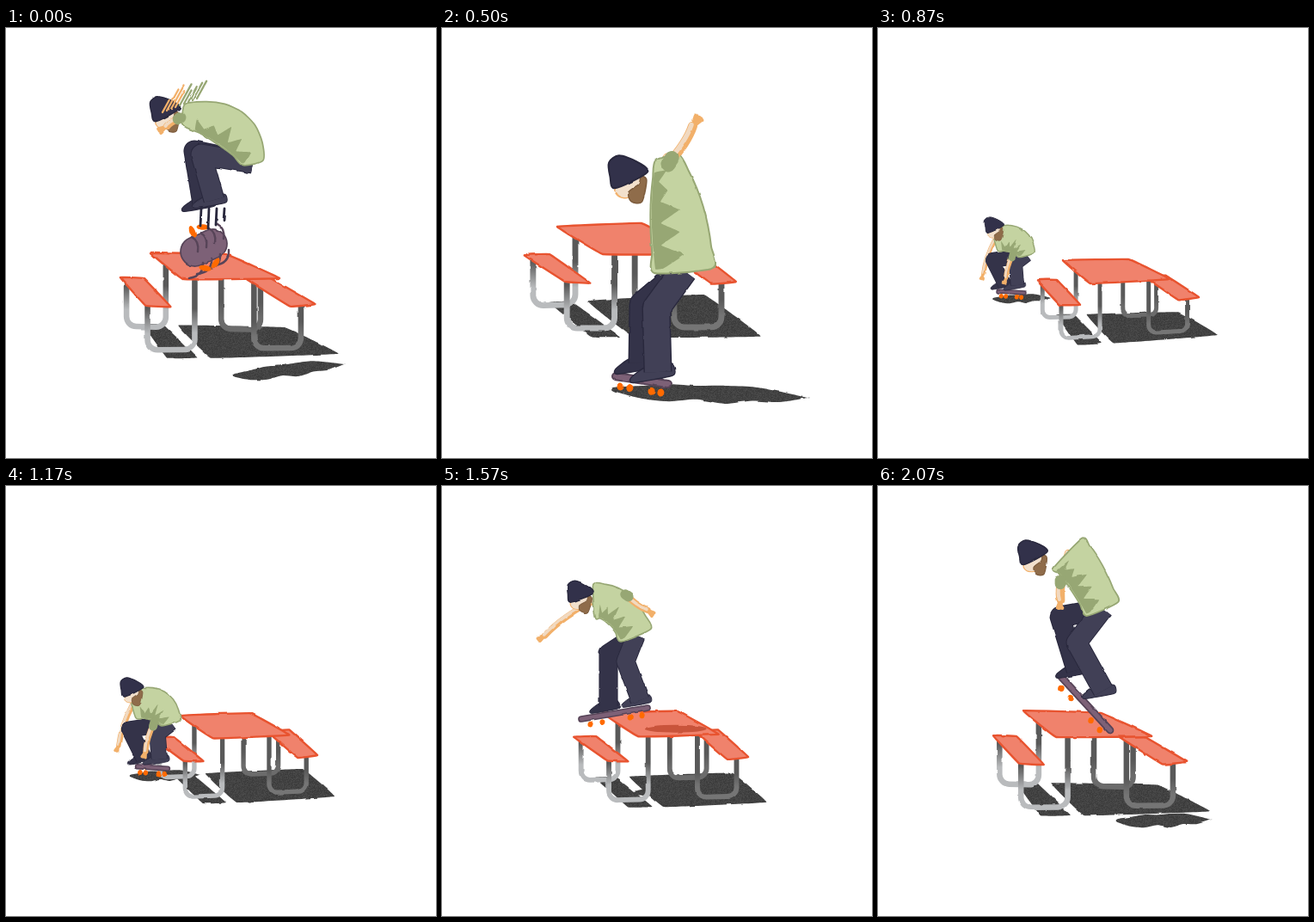
An HTML page with a canvas for the animation above (2100 ms loop, 500 by 500 pixels).

```html
<!DOCTYPE html>
<html lang="en">
<head>
<meta charset="utf-8">
<title>Skater over a picnic table</title>
<style>
html, body { margin: 0; width: 100%; height: 100%; overflow: hidden; background: #fff; }
canvas { display: block; width: 500px; height: 500px; filter: url(#rough); }
svg { position: absolute; width: 0; height: 0; }
</style>
</head>
<body>
<svg aria-hidden="true">
  <filter id="rough" x="0" y="0" width="1" height="1" color-interpolation-filters="sRGB">
    <feTurbulence id="wobble" type="fractalNoise" baseFrequency=".07" numOctaves="2" result="n"/>
    <feDisplacementMap in="SourceGraphic" in2="n" scale="2.5" xChannelSelector="R" yChannelSelector="G"/>
  </filter>
</svg>
<canvas id="stage" width="500" height="500"></canvas>
<script>
const LOOP = 2100, CUT = 670;
const ctx = document.getElementById('stage').getContext('2d');
const wobble = document.getElementById('wobble');
const ink = '#29283d', fire = '#ff6a00', skin = '#f2b06a', plum = '#574458',
  shirtTone = '#c4d3a1', leaf = '#97a774', rust = '#c9543b';

const lerp = (a, b, u) => a + (b - a) * u;
const mix = (p, q, u) => p.map((v, i) => lerp(v, q[i], u));
const pairs = s => s.split(' ').map(p => p.split(',').map(Number));
function seeded(seed) {
  return () => (seed = seed * 16807 % 2147483647) / 2147483647;
}

// ---- Drawing helpers ----

// Closed outline; k sets how round the corners are
function blob(pts, fill, line, width, k = .1) {
  const n = pts.length, at = i => pts[(i + n) % n];
  ctx.beginPath();
  ctx.moveTo(...pts[0]);
  for (let i = 0; i < n; i++) {
    const [p, a, b, q] = [at(i - 1), at(i), at(i + 1), at(i + 2)];
    ctx.bezierCurveTo(a[0] + (b[0] - p[0]) * k, a[1] + (b[1] - p[1]) * k,
      b[0] - (q[0] - a[0]) * k, b[1] - (q[1] - a[1]) * k, b[0], b[1]);
  }
  ctx.fillStyle = fill;
  ctx.fill();
  if (line) stroke(line, width);
}

function stroke(color, width, cap = 'round') {
  ctx.strokeStyle = color;
  ctx.lineWidth = width;
  ctx.lineCap = cap;
  ctx.stroke();
}

function trace(pts) {
  ctx.beginPath();
  for (const p of pts) ctx.lineTo(...p);
}

function curve(a, c, b, color, width) {
  ctx.beginPath();
  ctx.moveTo(...a);
  ctx.quadraticCurveTo(...c, ...b);
  stroke(color, width);
}

function ellipse([x, y], rx, ry, turn, fill) {
  ctx.beginPath();
  ctx.ellipse(x, y, rx, ry, turn, 0, 7);
  ctx.fillStyle = fill;
  ctx.fill();
}

// Band along a curve through a, m, b; at(s, o) spans it, o from -1 to 1
function band(a, m, b, halfWidth) {
  const c = [0, 1].map(i => 2 * m[i] - (a[i] + b[i]) / 2);
  return (s, o) => {
    const p = mix(a, c, s), q = mix(c, b, s), [x, y] = mix(p, q, s);
    const dx = q[0] - p[0], dy = q[1] - p[1];
    const w = o * halfWidth(s) / (Math.hypot(dx, dy) || 1);
    return [x + dy * w, y - dx * w];
  };
}

const steps = n => Array.from({ length: n + 1 }, (_, i) => i / n);

// Grainy asphalt tone for the ground shadows
const grain = (() => {
  const tile = document.createElement('canvas');
  tile.width = tile.height = 128;
  const c = tile.getContext('2d'), rnd = seeded(7);
  for (let i = 0; i < 128 * 128; i++) {
    const v = 58 + rnd() * 18 | 0;
    c.fillStyle = `rgb(${v},${v},${v})`;
    c.fillRect(i % 128, i >> 7, 1, 1);
  }
  return ctx.createPattern(tile, 'repeat');
})();

// ---- Table: four corners of the top and a height place everything else ----

const views = [
  [870, 215, 270, 292, 269, 339, 292, 247, 297, 62],
  [1370, 194, 265, 279, 261, 323, 288, 237, 291, 70],
  [2100, 168, 261, 258, 264, 318, 291, 206, 292, 82],
  [2600, 134, 231, 232, 227, 300, 263, 187, 263, 86]
];

// Maps (across, deep, down) of the table to the stage
function tableView(t) {
  const i = t < 1370 ? 0 : t < 2100 ? 1 : 2;
  const u = (t - views[i][0]) / (views[i + 1][0] - views[i][0]);
  const v = mix(views[i], views[i + 1], i === 2 ? u ** 1.6 : u);
  const at = (x, z, y) => {
    const [px, py] = mix(mix(v.slice(1, 3), v.slice(3, 5), x), mix(v.slice(7, 9), v.slice(5, 7), x), z);
    return [px, py + y * v[9]];
  };
  return { at, height: v[9] };
}

function drawGround({ at }) {
  blob([at(-.1, 0, 1.02), at(.17, 0, 1.02), at(.06, 1.25, 1.02), at(-.24, 1.25, 1.02)], grain, null, 0, .02);
  blob([at(.36, 0, 1.02), at(1.74, 0, 1), at(1.46, 1.25, 1), at(.2, 1.25, 1.03)], grain, null, 0, .02);
}

function drawTable({ at, height }) {
  const leg = (left, z, benchLeft, light) => {
    const right = left + .49;
    const a = at(left, z, benchLeft ? .37 : .03), d = at(right, z, benchLeft ? .03 : .37);
    const b = at(left, z, 1), c = at(right, z, 1);
    const tone = ctx.createLinearGradient(0, d[1], 0, b[1]);
    tone.addColorStop(.4, '#595959');
    tone.addColorStop(.75, light);
    ctx.beginPath();
    ctx.moveTo(...a);
    ctx.arcTo(...b, ...c, height * .14);
    ctx.arcTo(...c, ...d, height * .14);
    ctx.lineTo(...d);
    stroke(tone, height * .08);
  };
  const plank = (...pts) => blob(pts, '#f0826c', '#e8532f', 2.4, .02);
  leg(.82, .15, false, '#6b6b6b');
  leg(-.36, .15, true, '#b9bbbd');
  leg(.75, .97, false, '#757575');
  leg(-.37, 1, true, '#b9bbbd');
  plank(at(1.25, 0, .34), at(1.55, 0, .31), at(1.37, 1, .37), at(1.11, 1, .4));
  plank(at(-.39, 0, .37), at(-.09, 0, .37), at(-.13, 1, .39), at(-.39, 1, .37));
  plank(at(0, 0, 0), at(1, 0, 0), at(1, 1, 0), at(0, 1, 0));
}

// ---- Skater: a jointed figure, its key poses and the motion between ----

const joints = ['head', 'neck', 'spine', 'hip', 'kneeFar', 'footFar', 'kneeNear', 'footNear',
  'handFar', 'shoulder', 'handNear', 'tail', 'nose', 'shadeFrom', 'shadeTo'];

// size of the figure, tilt of the head, shirt half widths, deck thickness
function pose(time, size, tilt, top, hem, deck, places) {
  const p = { time, body: [size, tilt, top, hem, deck] };
  pairs(places).forEach((xy, i) => p[joints[i]] = xy);
  return p;
}

function moved(from, time, scale, dx, dy) {
  const [size, tilt, ...widths] = from.body;
  const p = { time, body: [size * scale, tilt, ...widths.map(w => w * scale)] };
  for (const j of joints) p[j] = [from[j][0] * scale + dx, from[j][1] * scale + dy];
  return p;
}

const crouch = pose(870, .49, -.45, 13, 9, 4,
  '137,234 136,246 160,247 173,264 133,270 147,298 160,274 162,299 121,291 157,263 147,297 140,306 170,308 134,315 201,314');
const ollie = pose(1370, .62, -.4, 16, 13, 9,
  '146,152 148,155 183,150 210,172 174,181 173,239 191,196 198,239 92,201 198,150 210,182 152,252 201,252 218,334 288,333');
const land = pose(1770, .72, -.36, 22, 25, 3,
  '179,108 206,112 226,135 241,175 213,208 214,273 236,212 263,259 134,156 228,102 281,116 172,290 277,264 224,378 246,377');
const pop = pose(2070, .75, -.5, 24, 20, 7,
  '183,84 221,78 241,104 261,143 212,152 231,214 231,182 262,238 212,142 212,110 212,142 213,222 270,284 278,389 387,388');
const flip = pose(2100, .76, -.5, 12, 12, 34,
  '188,101 207,101 261,117 287,157 219,143 229,204 227,147 242,200 190,115 203,104 179,120 220,260 240,251 266,404 393,391');
const drop = pose(2400, .8, -.75, 9, 25, 16,
  '205,155 239,137 267,190 274,245 246,298 247,380 255,302 255,378 240,150 234,137 161,164 231,402 258,397 224,426 372,402');
const roll = pose(2600, 1, -.46, 14, 34, 8,
  '220,177 262,151 273,212 281,282 234,322 233,390 249,326 251,400 264,170 263,158 298,104 202,405 262,414 200,420 425,430');
const keys = [moved(crouch, 670, .9, -4, 31), crouch, moved(crouch, 1170, 1.2, -16, -41),
  ollie, land, pop, flip, drop, roll, moved(roll, 2700, 1, 6, 4)];

function skaterAt(t) {
  const i = Math.max(1, keys.findIndex(k => k.time >= t));
  const a = keys[i - 1], b = keys[i], p = {};
  for (const part of ['body', ...joints]) p[part] = mix(a[part], b[part], (t - a.time) / (b.time - a.time));
  return p;
}

// Points drawn around an origin, then turned and scaled
function placed(points, [x, y], turn, scale) {
  const c = Math.cos(turn) * scale, s = Math.sin(turn) * scale;
  return pairs(points).map(([px, py]) => [x + px * c - py * s, y + px * s + py * c]);
}

function drawShadow({ body: [size], shadeFrom: a, shadeTo: b }) {
  const rnd = seeded(31);
  const thick = Math.min(10 * size, Math.hypot(b[0] - a[0], b[1] - a[1]) * .08);
  const at = band(a, mix(a, b, .5), b, s => thick * Math.sqrt(Math.sin(Math.PI * Math.min(1, s + .03))));
  const edge = o => steps(7).map(s => at(s, o * (.7 + .6 * rnd())));
  blob([...edge(1), ...edge(-1).reverse()], grain, null, 0, .12);
}

function drawBoard({ body: [size, , , , deck], tail, nose }) {
  const turn = Math.atan2(nose[1] - tail[1], nose[0] - tail[0]);
  const spinning = deck > 12, flipped = deck > 25;
  const line = 1 + size;
  trace([tail, nose]);
  stroke(plum, deck + line);
  stroke('#7d6177', Math.max(1, deck - line));
  if (flipped) {
    for (let i = 0; i < 4; i++) {
      const x = tail[0] - 4 + i * 10, y = tail[1] - 17 - i * 5;
      curve([x, y], [x + 9, y + 5], [x + 7, y + 17], plum, 2.5);
      curve([x - 4, y + 48], [x + 14, y + 46], [x + 13, y + 30], plum, 2.5);
    }
  }
  [.12, .3, .72, .9].forEach((s, i) => {
    const drop = (deck / 2 + 7 * size) * (flipped && i % 2 ? -1 : 1);
    const [x, y] = mix(tail, nose, s);
    const at = [x - Math.sin(turn) * drop, y + Math.cos(turn) * drop];
    ellipse(at, 1 + 3 * size, (1 + 3.5 * size) * (spinning ? 2 : 1), spinning ? i - 1.4 : .2, fire);
  });
}

function drawLeg(hip, knee, foot, size, fill) {
  const shoe = placed('17,-7 17,6 -30,9 -32,3 -14,-7', foot, -.12, size);
  const line = 1.4 * size;
  blob(shoe, fill, ink, line);
  trace([hip, knee, foot]);
  stroke(ink, 33 * size, 'butt');
  stroke(fill, 33 * size - 2 * line, 'butt');
}

function drawArm(from, hand, size, sleeve) {
  const dx = hand[0] - from[0], dy = hand[1] - from[1], len = Math.hypot(dx, dy) || 1;
  const bend = [from[0] + dx / 2 - dy * .08, from[1] + dy / 2 + dx * .08];
  const reach = Math.max(0, 1 - 12 * size / len), wrist = mix(from, hand, reach);
  curve(from, bend, wrist, skin, 11 * size);
  for (const spread of [-.25, .1, .35]) {
    const f = 12 * size / len;
    trace([wrist, [wrist[0] + (dx - dy * spread) * f, wrist[1] + (dy + dx * spread) * f]]);
    stroke(skin, 5.5 * size);
  }
  const lift = ([x, y]) => [x - 1.5 * size, y - 1.5 * size];
  curve(lift(from), lift(bend), lift(wrist), '#f1d9c0', 5.5 * size);
  if (sleeve) {
    trace([from, mix(from, hand, .12)]);
    stroke(leaf, 17 * size);
  }
}

function drawShirt({ body: [size, , top, hem], neck, spine, hip }) {
  const rnd = seeded(12);
  const bulge = 31 * size - (top + hem) / 2;
  const at = band(neck, spine, hip, s => lerp(top, hem, s) + bulge * 4 * s * (1 - s));
  const edge = o => steps(6).map(s => at(s, o));
  blob([...edge(1), ...edge(-1).reverse()], shirtTone, leaf, 1 + size, .12);
  // jagged folds along the belly side
  const fold = steps(9).map((s, i) => at(lerp(.97, .12, s), -.75 + (i % 2 ? .75 : .15) * (.5 + rnd())));
  blob([...steps(5).map(s => at(lerp(.12, .97, s), -.95)), ...fold], leaf, null, 0, .04);
}

function drawHead({ body: [size, tilt], head }) {
  const part = (points, fill, line, width) => blob(placed(points, head, tilt, size), fill, line, width * size, .14);
  part('-20,0 14,0 6,10 -10,17 -21,11', '#f2e0cc', skin, 1.5);
  part('-9,11 6,8 12,1 16,8 0,28 -11,22', '#8f6c4a', '#7d5c3d', 1.5);
  part('-21,0 -20,-15 -14,-30 0,-32 15,-17 21,0', '#32314a', ink, 2);
}

function drawSkater(p) {
  const size = p.body[0];
  drawBoard(p);
  drawArm(p.neck, p.handFar, size);
  drawLeg(p.hip, p.kneeFar, p.footFar, size, '#343349');
  drawLeg(p.hip, p.kneeNear, p.footNear, size, '#414056');
  drawShirt(p);
  drawHead(p);
  drawArm(p.shoulder, p.handNear, size, true);
}

// Paint flung off at the top of the flip
function drawSplash({ head: [x, y], footNear: [fx, fy] }) {
  const rnd = seeded(5);
  for (let i = 0; i < 9; i++) {
    const sx = x - 6 + i * 5, sy = y - 3 - i * 2, len = 14 + 16 * rnd();
    trace([[sx, sy], [sx + len * .55, sy - len]]);
    stroke(i < 4 ? skin : leaf, 2.3);
  }
  for (let i = 0; i < 4; i++) {
    trace([[fx - 15 + i * 9, fy + 10], [fx - 16 + i * 9, fy + 22 + 12 * rnd()]]);
    stroke(ink, 2.8);
  }
}

// Trails of the feet and board on landing
function drawTrails({ footNear: [x, y] }) {
  for (let i = 0; i < 4; i++) {
    const sx = x - 52 + i * 6, sy = y - 46 + i * 14;
    curve([sx, sy], [sx + 2, sy + 28 - i * 4], [x - 29 + i * 3, y + 12], ink, 2.5);
  }
  curve([x - 50, y + 3], [x - 46, y + 18], [x - 33, y + 26], plum, 3);
}

function draw(t) {
  const time = t < CUT ? t + LOOP : t;
  const view = tableView(time), p = skaterAt(time);
  ctx.clearRect(0, 0, 500, 500);
  ctx.lineJoin = 'round';
  wobble.setAttribute('seed', 1 + Math.round(t / 100));
  drawGround(view);
  drawShadow(p);
  drawTable(view);
  if (time > 1500 && time < 2000) ellipse(view.at(.6, .72, 0), 36, 4.5, 0, rust);
  drawSkater(p);
  if (t === 0) drawSplash(p);
  if (t === 300) drawTrails(p);
}

// Drawn at ten poses a second, with a cut
const step = t => t < CUT ? Math.floor(t / 100) * 100 : CUT + Math.floor((t - CUT) / 100) * 100;
const start = performance.now();
let shown = -1;
function tick() {
  const t = step((performance.now() - start) % LOOP);
  if (t !== shown) draw(shown = t);
  requestAnimationFrame(tick);
}
tick();
</script>
</body>
</html>
```
